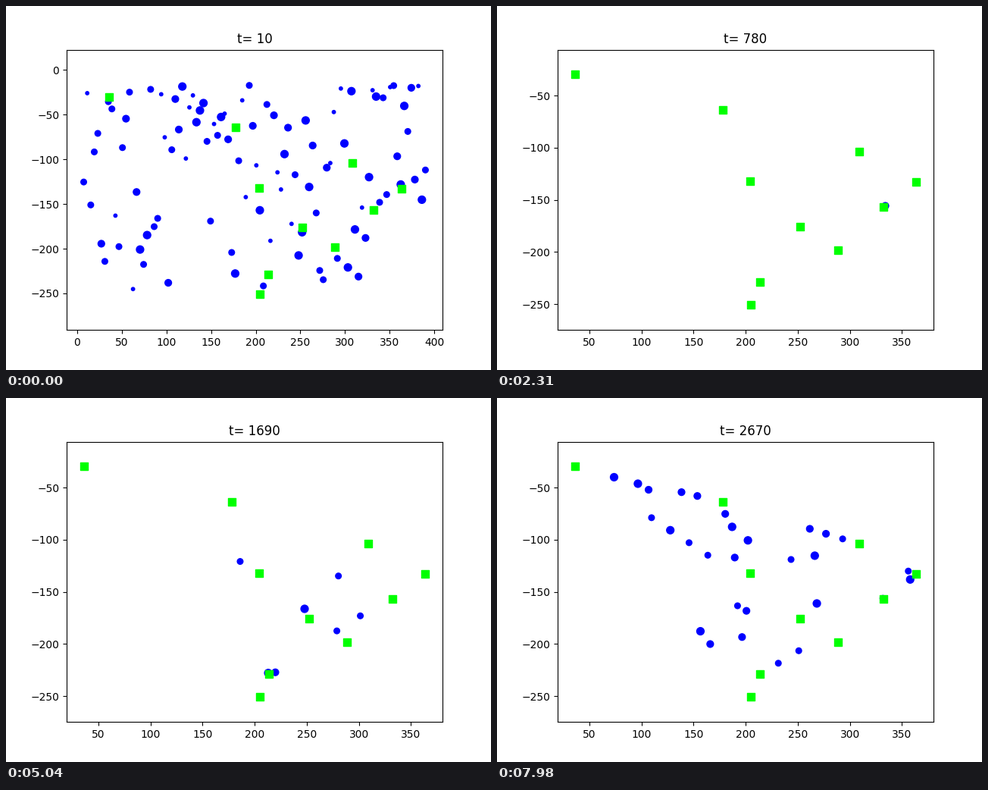
Recreate the animation shown at these times as a matplotlib script. Size 640 by 480 pixels, loop 8000 ms.

```python
import numpy as np
import matplotlib.pyplot as plt
from matplotlib.animation import FuncAnimation

FRAMES = 267
LOOP_MS = 8000
SPEED = 10.3                      # data units per frame
SIZES = (10, 30, 40, 50)
PEOPLE = 98
TRIPS = 125
BOX = np.array([496, 369.6])      # axes size in pixels

STOPS = {
    "A": (35.9, -29.8), "B": (177.8, -63.9), "C": (204, -132),
    "D": (252, -176), "E": (288.4, -198), "F": (214, -229),
    "G": (204.8, -251), "H": (308.6, -104), "I": (332, -157),
    "J": (363.8, -133),
}
NAMES = list(STOPS)
stop_xy = np.array(list(STOPS.values()))
rng = np.random.default_rng(12)


def crowd():
    """People spread over the field, each heading for the nearest stop."""
    x = rng.permutation(np.linspace(7.3, 390.1, PEOPLE))
    y = rng.permutation(-17.2 - 228 * np.linspace(0, 1, PEOPLE) ** 1.5)
    for p in np.column_stack([x, y]):
        near = stop_xy[np.argmin(np.hypot(*(stop_xy - p).T))]
        yield p, near, 0, rng.choice(SIZES)


def queue(route, leave, count=1, gap=1.0):
    """People leaving one stop for another, one after the other."""
    a, b = (stop_xy[NAMES.index(k)] for k in route)
    for i in range(count):
        yield a, b, leave + i * gap, rng.choice(SIZES[1:])


def traffic():
    """Random trips, more and more of them; the west wakes up late."""
    for u in rng.random(TRIPS):
        leave = 55 + (FRAMES - 55) * np.sqrt(u)
        names = NAMES if leave > 85 else NAMES[2:]
        yield from queue(rng.choice(names, 2, replace=False), leave)


walks = [
    *crowd(),
    *traffic(),
    *queue("AC", 35.5),
    *queue("IJ", 51.8, 2, 0.2),
    *queue("EI", 52.3),
    *queue("CF", 94.8, 6),
    *queue("AJ", 96.1),
    *queue("FI", 97, 3),
    *queue("CF", 130.3, 2),
    *queue("FD", 133.7, 2),
    *queue("AF", 180.3, 5),
    *queue("FB", 189.9, 3),
    *queue("BC", 194, 3, 0.35),
    *queue("EB", 196.6, 2, 0.3),
    *queue("BH", 223.7, 2),
    *queue("FE", 229.2, 3, 0.3),
    *queue("BC", 229.6, 2, 0.4),
    *queue("AG", 245.2, 2, 1.5),
    *queue("AE", 251.1, 4, 2.1),
    *queue("BH", 254.3, 2, 3.2),
    *queue("AH", 259.9, 2, 2.3),
]
src, dst, first, area = (np.array(col, float) for col in zip(*walks))
span = np.hypot(*(dst - src).T)

fig, ax = plt.subplots(figsize=(6.4, 4.8), dpi=100)
dots = ax.scatter([], [], color="blue", zorder=2)
ax.scatter(*stop_xy.T, s=50, marker="s", color="lime", zorder=3)
title = ax.set_title("")


def fit(points):
    """Equal scale on both axes with a 5% margin."""
    lo, hi = points.min(axis=0), points.max(axis=0)
    half = (1.1 * (hi - lo) / BOX).max() * BOX / 2
    mid = (lo + hi) / 2
    ax.set_xlim(mid[0] - half[0], mid[0] + half[0])
    ax.set_ylim(mid[1] - half[1], mid[1] + half[1])


def draw(frame):
    gone = (frame - first) * SPEED
    out = (gone >= 0) & (gone < span)
    part = (gone[out] / span[out])[:, None]
    pos = src[out] + (dst[out] - src[out]) * part
    dots.set_offsets(pos)
    dots.set_sizes(area[out])
    fit(np.vstack([stop_xy, pos]))
    title.set_text(f"t= {10 * (frame + 1)}")
    return dots, title


anim = FuncAnimation(fig, draw, frames=FRAMES, interval=LOOP_MS / FRAMES,
                     init_func=lambda: draw(0), repeat=True, repeat_delay=0,
                     blit=False)
plt.show()
```
